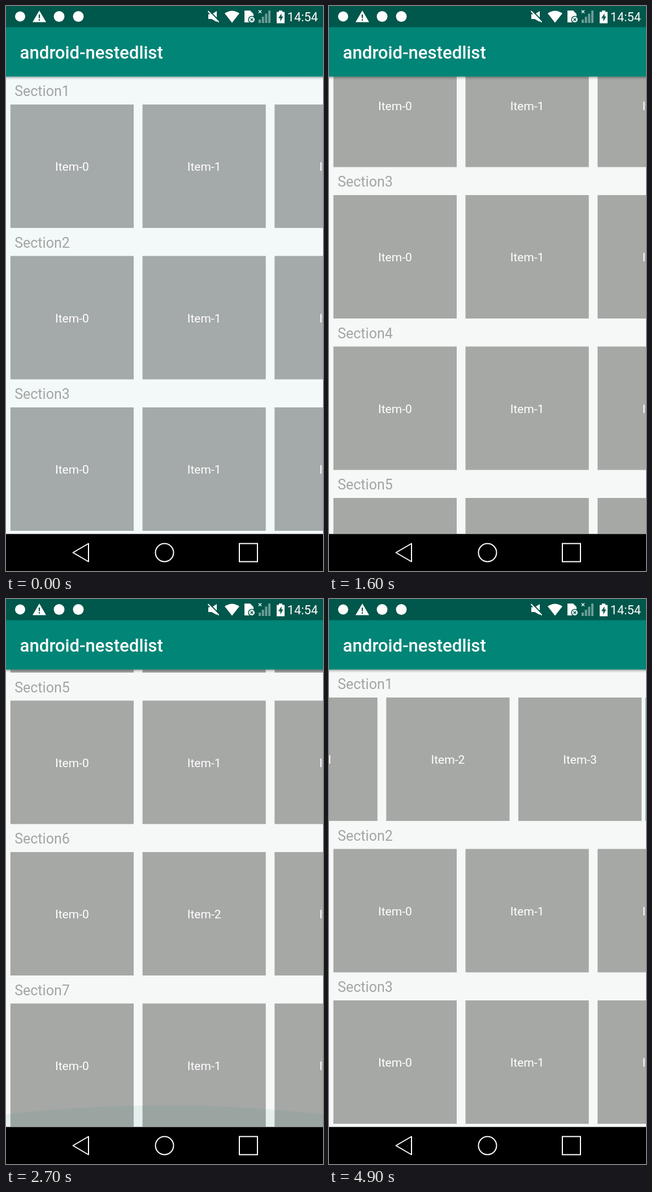
These frames come from a looping animation (561 px wide and 998 px high, 5 s). An HTML page:

```html
<!DOCTYPE html>
<html lang="en">
<head>
<meta charset="utf-8">
<title>Nested list</title>
<style>
  html, body { margin: 0; width: 100%; height: 100%; overflow: hidden; }
  svg { display: block; font-family: Roboto, sans-serif; }
  #page { fill: var(--page); }
  .tile { fill: var(--tile); }
  .label { fill: #fff; font-size: 21px; text-anchor: middle; }
  .heading { fill: #a3a5a4; font-size: 25px; }
  .line { fill: none; stroke: #fff; stroke-width: 2; }
  .cut { fill: none; stroke: #00574b; }
</style>
</head>
<body>
<svg id="stage" width="561" height="998" viewBox="0 0 561 998">
  <defs>
    <linearGradient id="shade" x2="0" y2="1">
      <stop stop-color="#000" stop-opacity=".32"/>
      <stop offset=".5" stop-color="#000" stop-opacity=".1"/>
      <stop offset="1" stop-color="#000" stop-opacity="0"/>
    </linearGradient>
    <clipPath id="view"><path d="M0 124H561V932.6H0z"/></clipPath>
  </defs>
  <rect id="page" width="561" height="998"/>
  <g clip-path="url(#view)">
    <g id="list"></g>
    <g fill="#008577">
      <ellipse id="topGlow" cx="280.5" rx="841.5"/>
      <ellipse id="bottomGlow" cx="280.5" rx="841.5"/>
      <rect id="sideGlow" x="559.8" y="174" width="1.2" height="218" opacity=".5"/>
    </g>
  </g>

  <rect y="124.7" width="561" height="6" fill="url(#shade)"/>
  <rect width="561" height="124.7" fill="#008577"/>
  <rect width="561" height="37.5" fill="#00574b"/>
  <text x="24.6" y="93" fill="#fff" font-size="31.2" font-weight="500">android-nestedlist</text>

  <g id="status" fill="#fff">
    <circle cx="25" cy="18.5" r="9"/>
    <path d="M59 8L71 28.5H47z"/>
    <path class="cut" d="M59 15V21.5M59 23.2V25.8" stroke-width="2.2"/>
    <circle cx="94" cy="18.5" r="9.5"/>
    <circle cx="128" cy="18.5" r="9.5"/>
    <path d="M358 14.5H364L373 9V28L364 23H358z"/>
    <path class="cut" d="M359.5 8L378 27" stroke-width="2"/>
    <path class="line" d="M357.5 9L376.5 28.5"/>
    <path d="M400 29.5L387 13Q400 4 413 13z"/>
    <path d="M422 8H432L438 14V29H422z"/>
    <circle class="cut" cx="435" cy="24" r="5.8" style="fill:#fff" stroke-width="1.6"/>
    <path class="cut" d="M432.7 21.7l4.6 4.6m0-4.6l-4.6 4.6" stroke-width="1.6"/>
    <path d="M447 24h4v6h-4zM452.7 19h4v11h-4zM458.4 13.5h4v16.5h-4zM464.1 8h4v22h-4z" opacity=".42"/>
    <path d="M447 7.5l5 5m0-5l-5 5" stroke="#fff" stroke-width="1.4"/>
    <path d="M479 10.5H483V8H489V10.5H493V30.5H479z"/>
    <path d="M487.5 13L482 21.5H485.5V27.5L490.5 18.5H487.5z" fill="#00574b"/>
    <text x="497.8" y="27" font-size="21.8">14:54</text>
  </g>

  <rect y="932.6" width="561" height="66"/>
  <g class="line">
    <path d="M118.5 965.5L146 949.5V981.5z" stroke-linejoin="round"/>
    <circle cx="280.5" cy="965.5" r="16"/>
    <rect x="413" y="949.5" width="32" height="32"/>
  </g>
</svg>
<script>
const byId = id => document.getElementById(id);
const TOP = 124.7, BOTTOM = 932.6, SECTION = 267.5, PITCH = 233.75;
const LIST_END = 1064.5, ROW_END = 374;

function tile(name, column, y) {
  const x = 7.8 + column * PITCH;
  return `<rect class="tile" x="${x}" y="${y}" width="218.2" height="218"/>
    <text class="label" x="${x + 109.1}" y="${y + 117}">Item-${name}</text>`;
}

function section(number) {
  const y = 174 + (number - 1) * SECTION;
  const order = number === 6 ? [0, 2, 1, 3] : [0, 1, 2, 3];
  return `<text class="heading" x="15.2" y="${y - 14.6}">Section${number}</text>
    <g id="row${number}">${order.map((name, i) => tile(name, i, y)).join('')}</g>`;
}

byId('list').innerHTML = [1, 2, 3, 4, 5, 6, 7].map(section).join('');

const progress = (t, from, to) => Math.min(1, Math.max(0, (t - from) / (to - from)));
const smooth = x => x * x * (3 - 2 * x);
const bump = x => Math.sin(Math.PI * x);

// The downward swipes: a smooth curve through a few [time, offset] points.
const swipe = [[900, 0], [1200, 114], [1600, 375], [2000, 768.5], [2600, LIST_END]];

function slope(i) {
  const before = swipe[i - 1], after = swipe[i + 1];
  return before && after ? (after[1] - before[1]) / (after[0] - before[0]) : 0;
}

function swipeDown(t) {
  const i = Math.max(0, swipe.findLastIndex(point => point[0] <= t));
  if (i === swipe.length - 1) return LIST_END;
  const [t0, a] = swipe[i], [t1, b] = swipe[i + 1];
  const x = progress(t, t0, t1), rest = 1 - x;
  return a + (b - a) * smooth(x)
    + (t1 - t0) * x * rest * (slope(i) * rest - slope(i + 1) * x);
}

// The fling back gathers speed until it hits the top.
const listOffset = t => swipeDown(t) - LIST_END * progress(t, 3200, 3800) ** 1.6;

// An overscroll arc: a circle squashed towards the edge it grows from.
function setGlow(id, edge, side, size) {
  const arc = byId(id);
  arc.setAttribute('cy', edge - side * 728.8 * size);
  arc.setAttribute('ry', 841.5 * size);
  arc.setAttribute('opacity', Math.min(.25, .6 * size * size));
}

function draw(now) {
  const t = Math.floor(now % 5000 / 100) * 100;
  const [page, tileColor] = t < 1000 ? ['#f3f9f9', '#a4aaa9'] : ['#f6f8f7', '#a6a8a6'];
  byId('stage').style.setProperty('--page', page);
  byId('stage').style.setProperty('--tile', tileColor);
  byId('list').setAttribute('transform', `translate(0 ${-listOffset(t)})`);
  const rowOffset = ROW_END * smooth(progress(t, 4500, 4900));
  byId('row1').setAttribute('transform', `translate(${-rowOffset} 0)`);
  setGlow('topGlow', TOP, 1, bump(progress(t, 3800, 4300)));
  setGlow('bottomGlow', BOTTOM, -1, .34 * bump(progress(t, 2500, 2900)));
  byId('sideGlow').style.display = rowOffset === ROW_END ? '' : 'none';
}

const start = performance.now();
function frame() {
  draw(performance.now() - start);
  requestAnimationFrame(frame);
}
frame();
</script>
</body>
</html>
```
